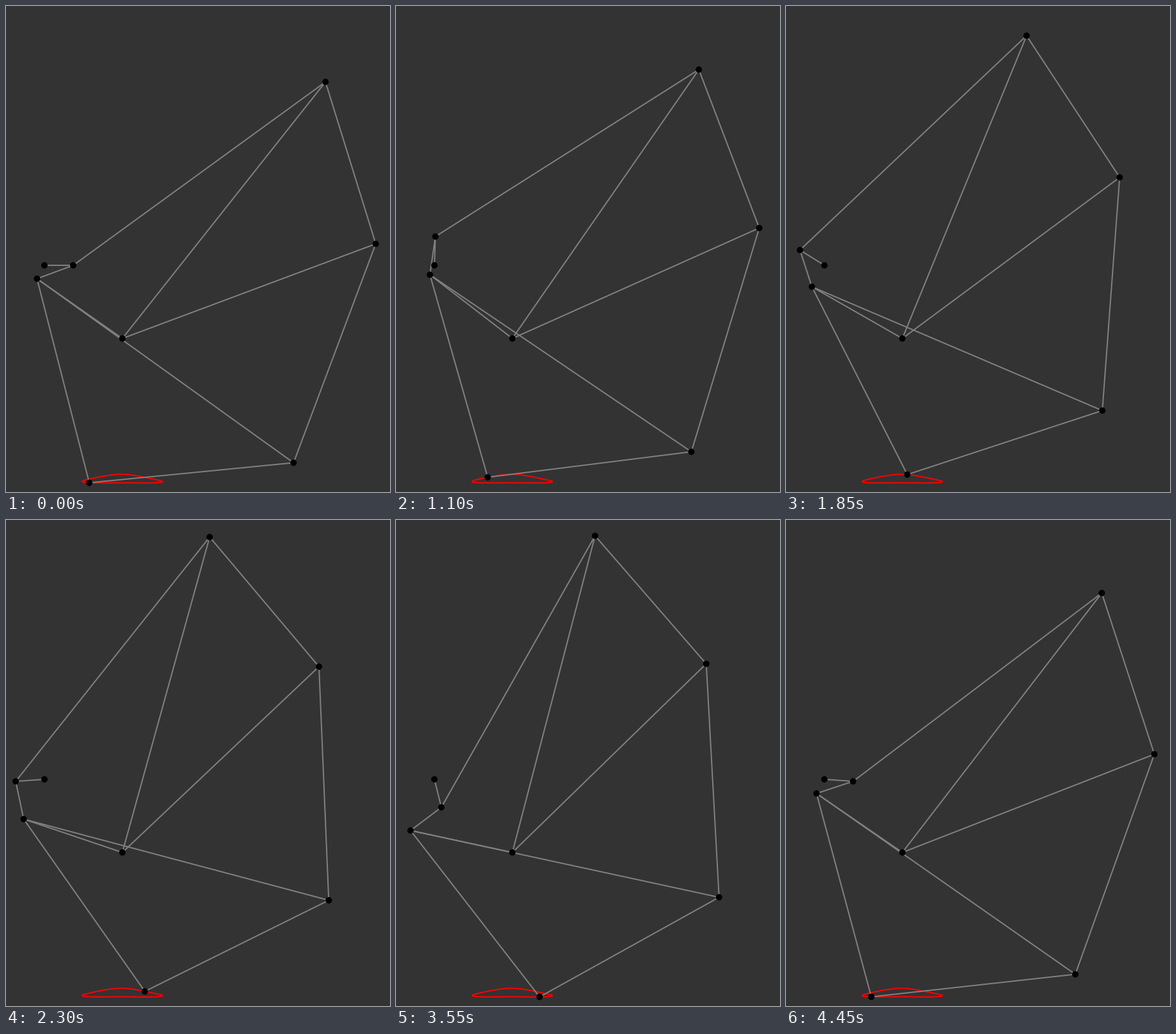
These frames come from a looping animation (600 px wide and 759 px high, 4.5 s). A matplotlib script:

```python
import numpy as np
import matplotlib.pyplot as plt
from matplotlib.animation import FuncAnimation
from matplotlib.collections import LineCollection
from matplotlib.patches import Circle, Polygon

WIDTH, HEIGHT = 600, 759
FRAMES, INTERVAL = 90, 50
DPI = 128
PX = 72 / DPI  # one pixel in points

HUB = np.array([60.0, 405.0])
PIVOT = np.array([181.8, 519.2])
CRANK = 45

RODS = ["hub crank", "crank top", "crank knee", "pivot top", "pivot right", "pivot knee",
        "top right", "right heel", "knee heel", "knee foot", "heel foot"]


def joint(p, q, rp, rq, side):
    """Point at distance rp from p and rq from q, on the given side of p-q."""
    gap = np.hypot(*(q - p))
    u = (q - p) / gap
    along = (rp**2 - rq**2 + gap**2) / (2 * gap)
    across = np.sqrt(rp**2 - along**2)
    return p + along * u + side * across * np.array([-u[1], u[0]])


def pose(frame):
    angle = 2 * np.pi * frame / FRAMES
    crank = HUB + CRANK * np.array([np.cos(angle), -np.sin(angle)])
    top = joint(crank, PIVOT, 487.25, 511.1, -1)
    right = joint(top, PIVOT, 264.8, 422.6, -1)
    knee = joint(crank, PIVOT, 60.3, 162.75, 1)
    heel = joint(right, knee, 365.2, 493.25, -1)
    foot = joint(heel, knee, 320.7, 328.95, -1)
    return dict(hub=HUB, pivot=PIVOT, crank=crank, top=top, right=right,
                knee=knee, heel=heel, foot=foot)


def segments(points):
    return [[points[name] for name in rod.split()] for rod in RODS]


fig = plt.figure(figsize=(WIDTH / DPI, HEIGHT / DPI), dpi=DPI, facecolor="#333333")
ax = fig.add_axes([0, 0, 1, 1])
ax.set_xlim(0, WIDTH)
ax.set_ylim(HEIGHT, 0)
ax.axis("off")

start = pose(0)
foot_path = [pose(frame)["foot"] for frame in range(FRAMES)]
ax.add_patch(Polygon(foot_path, fill=False, edgecolor="red", linewidth=2 * PX,
                     snap=False, zorder=1))
rods = LineCollection(segments(start), colors="#808080", linewidths=2 * PX, zorder=2)
rods.set_snap(False)
ax.add_collection(rods, autolim=False)
dots = {name: ax.add_patch(Circle(point, 5, facecolor="black", linewidth=0, zorder=3))
        for name, point in start.items()}


def update(frame):
    points = pose(frame)
    rods.set_segments(segments(points))
    for name, dot in dots.items():
        dot.center = points[name]
    return [rods, *dots.values()]


anim = FuncAnimation(fig, update, frames=FRAMES, interval=INTERVAL, repeat=True, repeat_delay=0)
plt.show()
```
